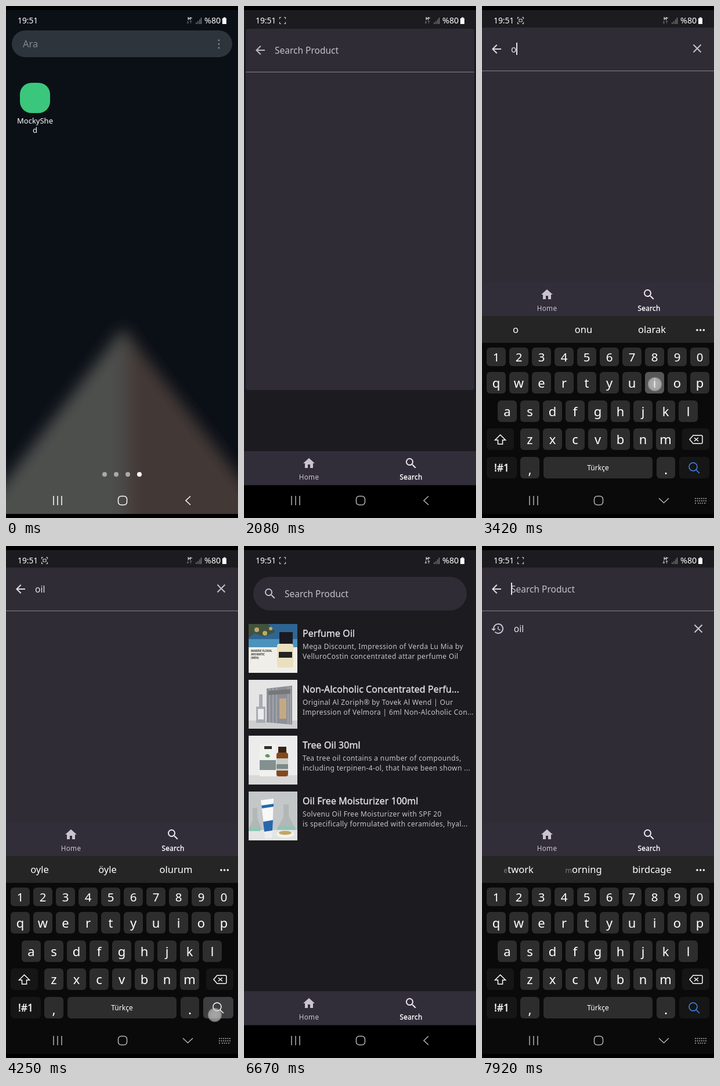
An HTML page without scripts that plays this animation: 400x880 px, repeating every 8 s.

```html
<!DOCTYPE html>
<html lang="en">
<head>
<meta charset="utf-8">
<title>Product search</title>
<style>
html,body{margin:0;width:100%;height:100%;overflow:hidden;background:#000}
#stage{position:relative;width:400px;height:880px;overflow:hidden;background:#000;color:#fff;font:15.5px "Noto Sans","Open Sans",sans-serif}
div,span,svg,g,i,b,path,circle{animation:none 8s linear infinite}
#stage div,#stage svg{position:absolute}
i,b{font-style:normal;font-weight:400}
.full{left:0;top:0;width:400px;height:880px}
.t{white-space:nowrap;line-height:20px}
.c{width:120px;text-align:center}
.mid{-webkit-text-stroke:.35px currentColor}
.ic{width:24px;height:24px;fill:currentColor}
.line{fill:none;stroke:currentColor;stroke-width:1.5}
.step{animation-timing-function:step-end}

/* launcher */
.home{background:#0b1017;animation-name:home}
.pill{left:10px;top:42px;width:380px;height:46px;border-radius:23px;background:#2e343b}
.app-icon{left:24px;top:132px;width:52px;height:52px;border-radius:20px;background:#3bc77b}
@keyframes home{0%{opacity:1}9.4%,100%{opacity:0}}
.splash{background:#1c1b1f;overflow:hidden;animation-name:splash}
.splash div{left:50%;top:50%;border-radius:50%;background:#3bc77b;transform:translate(-50%,-50%);animation-name:logo}
@keyframes splash{
 0%,3.1%{left:24px;top:132px;width:52px;height:52px;border-radius:20px;opacity:0}
 3.2%{left:24px;top:132px;width:52px;height:52px;border-radius:20px;opacity:1;animation-timing-function:ease-out}
 9.3%,12.5%{left:0;top:0;width:400px;height:880px;border-radius:0;opacity:1}
 14.6%,100%{left:0;top:0;width:400px;height:880px;border-radius:0;opacity:0}}
@keyframes logo{0%,3.2%{width:60px;height:60px;animation-timing-function:ease-out}9.3%,100%{width:150px;height:150px}}

/* app */
.app{animation-name:app}
@keyframes app{0%{opacity:0}9.4%,100%{opacity:1}}
.page{left:0;top:0;width:400px;height:824px;background:#1c1b1f}
.panel{background:#2f2c35;overflow:hidden;animation-name:panel}
@keyframes panel{
 0%,24.1%,58.2%,90.9%{left:16px;top:53px;width:368px;height:58px;border-radius:29px}
 26%,92.75%{left:3px;top:39px;width:394px;height:620px;border-radius:4px;animation-timing-function:ease-out}
 28.2%,54.8%,95%,100%{left:0;top:37px;width:400px;height:728px;border-radius:0}}
.field{left:0;top:0;width:400px;height:74px;color:#c6c1cb;animation-name:field}
@keyframes field{0%,24.1%,58.2%,90.9%{transform:translate(4px,-8px)}26%,54.8%,92.75%,100%{transform:none}}
.mag{animation-name:mag}
.arrow{color:#e0dce4;animation-name:arrow}
@keyframes mag{0%,24.1%,58.2%,90.9%{opacity:1}26%,54.8%,92.75%,100%{opacity:0}}
@keyframes arrow{0%,24.1%,58.2%,90.9%{opacity:0}26%,92.75%{opacity:.8}28.2%,54.8%,95%,100%{opacity:1}}
.rule{left:0;top:74px;width:400px;height:1px;background:#85818b}
.hint{animation-name:hint}
@keyframes hint{0%{opacity:1}40.6%{opacity:0}54.3%,100%{opacity:1}}
.q{color:#e6e1e5}
.q i,.clear{opacity:0}
.q i:nth-child(1),.clear{animation-name:q1}
.q i:nth-child(2){animation-name:q2}
.q i:nth-child(3){animation-name:q3}
@keyframes q1{0%{opacity:0}40.6%{opacity:1}54.3%,100%{opacity:0}}
@keyframes q2{0%{opacity:0}43.8%{opacity:1}54.3%,100%{opacity:0}}
@keyframes q3{0%{opacity:0}47.5%{opacity:1}54.3%,100%{opacity:0}}
.caret{left:50px;top:26px;width:1.5px;height:21px;background:#e6e1e5;animation-name:caret}
@keyframes caret{
 0%{opacity:0;transform:none}31%{opacity:1}36.5%{opacity:0}39.6%{opacity:1}
 40.6%{transform:translateX(9px)}43.8%{transform:translateX(13px)}47.5%{transform:translateX(18px)}
 52.5%{opacity:0}60%{transform:none}97%,100%{opacity:1;transform:none}}
.past{left:0;top:94px;width:400px;height:24px;color:#cac4d0;animation-name:past}
@keyframes past{0%{opacity:0}62%,100%{opacity:1}}
.nav{left:0;top:765px;width:400px;height:59px;background:#312d39;color:#cac4d0;animation-name:nav}
.nav::after{content:"";position:absolute;top:58px;width:400px;height:350px;background:#1c1b1f}
.nav .t{font-size:11.7px;letter-spacing:.35px}
@keyframes nav{
 0%,28.5%,57.5%,95.2%{transform:none;animation-timing-function:ease-out}
 32%,54.3%,99%,100%{transform:translateY(-290px)}}
.foot{left:0;top:824px;width:400px;height:56px;background:#000}

/* loading and results */
.spin{left:176px;top:376px;width:48px;height:48px;animation-name:wait}
@keyframes wait{0%{opacity:0}59.4%{opacity:1}71.9%,100%{opacity:0}}
.spin circle{fill:none;stroke:#d0cbd8;stroke-width:4;transform-origin:24px 24px;animation:turn 1.333333s linear infinite,arc 1.333333s ease-in-out infinite}
@keyframes turn{from{transform:rotate(131deg)}to{transform:rotate(561deg)}}
@keyframes arc{0%{stroke-dasharray:12 360;stroke-dashoffset:0}50%{stroke-dasharray:270 360;stroke-dashoffset:-20}100%{stroke-dasharray:12 360;stroke-dashoffset:-290}}
.list{animation-name:list}
@keyframes list{0%{opacity:0}71.9%,100%{opacity:1}}
.item{left:8px;width:392px;height:84px}
.item svg{left:0;top:0;width:84px;height:84px;animation-name:thumb}
.item .t{left:93px;font-size:12px;letter-spacing:.35px;line-height:16.5px;top:31px;color:#c8c3cc}
.item .h{top:6px;font-size:16px;letter-spacing:.06px;line-height:20px;color:#e6e1e5}
@keyframes thumb{0%,74%{opacity:0}80%,100%{opacity:1}}

/* keyboard */
.kb{left:0;top:533px;width:400px;height:347px;background:#0a0a0a;animation-name:kb}
@keyframes kb{
 0%,28.5%,57.5%,95.2%{transform:translateY(347px);animation-timing-function:ease-out}
 32.25%{transform:translateY(6px)}
 33.4%,54.3%,99%,100%{transform:none}}
.words{left:0;top:0;width:400px;height:46px;background:#252525;font-size:16.5px}
.words .c{top:13px}
.words .c:nth-child(1){left:-2px}.words .c:nth-child(2){left:115px}.words .c:nth-child(3){left:233px}
.set{left:0;top:0;opacity:0}
.first{animation-name:first}.second{animation-name:second}.third{animation-name:third}
@keyframes first{0%{opacity:1}40.6%{opacity:0}60%,100%{opacity:1}}
@keyframes second{0%{opacity:0}40.6%{opacity:1}44%,100%{opacity:0}}
@keyframes third{0%{opacity:0}44%{opacity:1}60%,100%{opacity:0}}
.gone{animation-name:gone}.faint{animation-name:faint}
@keyframes gone{0%{opacity:1}90%,100%{opacity:0}}
@keyframes faint{0%{opacity:1;font-size:1em}90%,100%{opacity:.4;font-size:.75em}}
.row{display:flex;gap:6px;left:8px;font-size:22px}
.row b,.key{display:block;width:33px;height:37px;line-height:37px;border-radius:6px;background:#2d2d2e;text-align:center}
.digits{top:54px;font-size:20.5px}
.digits b{height:32px;line-height:32px}
.key{top:242px}
.dark{background:#161616}
.low{font-size:23px;line-height:43px}
.press{left:0;top:0;width:33px;height:37px;border-radius:6px;background:#fff;opacity:0;animation-name:press}
@keyframes press{
 0%{opacity:0;transform:translate(320px,96px)}39.6%{opacity:.2}41.6%{opacity:0}
 42.7%{opacity:.2;transform:translate(281px,96px)}44.8%{opacity:0}
 46.3%{opacity:.2;transform:translate(339px,145px)}48.2%,100%{opacity:0;transform:translate(339px,145px)}}
.go{left:340px;width:52px;animation-name:go}
@keyframes go{0%{background:#161616;color:#4389f0}51.6%{background:#3e3e40;color:#fff}54.2%,100%{background:#161616;color:#4389f0}}

/* system */
.sys{animation-name:sys}
@keyframes sys{0%{color:#fff}9.4%,100%{color:#b4b4b4}}
.on{animation-name:on}.off{animation-name:off}
@keyframes on{0%{opacity:0}29%{opacity:1}55.2%{opacity:0}95.5%,100%{opacity:1}}
@keyframes off{0%{opacity:1}29%{opacity:0}55.2%{opacity:1}95.5%,100%{opacity:0}}
.rec{animation-name:app}
.dotrec{animation-name:dotrec}
@keyframes dotrec{0%{opacity:0}9.4%{opacity:1}20.875%{opacity:0}28.1%{opacity:1}71.2%,100%{opacity:0}}
.data{animation-name:data}
@keyframes data{0%{opacity:.45}33.4%{opacity:1}36.5%{opacity:.45}60.4%,100%{opacity:1}}
.plus{animation-name:list}
.touch{left:-12px;top:-12px;width:24px;height:24px;border-radius:50%;background:radial-gradient(#eee9,#ccca 55%,#aaa6 85%,#aaa0);animation-name:touch}
@keyframes touch{
 0%{opacity:0;transform:translate(50px,158px)}2.15%{opacity:1}4.1%{opacity:0}
 22.8%{opacity:1;transform:translate(210px,84px)}24.1%{opacity:0}
 39.6%{opacity:1;transform:translate(336px,650px)}41.6%{opacity:0}
 42.7%{opacity:1;transform:translate(298px,650px)}44.8%{opacity:0}
 46.3%{opacity:1;transform:translate(355px,699px)}48.2%{opacity:0}
 51.6%{opacity:1;transform:translate(360px,806px)}54.2%{opacity:0}
 89.6%{opacity:1;transform:translate(210px,84px)}90.9%,100%{opacity:0;transform:translate(210px,84px)}}
.edge{left:0;width:400px;height:7px;background:#000}
</style>
</head>
<body>
<svg width="0" height="0" style="position:absolute">
 <symbol id="mag" viewBox="0 0 24 24"><path d="M15.5 14h-.79l-.28-.27A6.47 6.47 0 0 0 16 9.5 6.5 6.5 0 1 0 9.5 16c1.61 0 3.09-.59 4.23-1.57l.27.28v.79l5 4.99L20.49 19l-4.99-5zm-6 0a4.5 4.5 0 1 1 0-9 4.5 4.5 0 0 1 0 9z"/></symbol>
 <symbol id="back" viewBox="0 0 24 24"><path d="M20 11H7.83l5.59-5.59L12 4l-8 8 8 8 1.41-1.41L7.83 13H20z"/></symbol>
 <symbol id="house" viewBox="0 0 24 24"><path d="M10 20v-6h4v6h5v-8h3L12 3 2 12h3v8z"/></symbol>
 <symbol id="close" viewBox="0 0 24 24"><path d="M5.5 5.5l13 13m0-13l-13 13" fill="none" stroke="currentColor" stroke-width="2"/></symbol>
 <symbol id="clock" viewBox="0 0 24 24"><path d="M13 3a9 9 0 0 0-9 9H1l4 4 4-4H6a7 7 0 1 1 7 7c-1.93 0-3.68-.79-4.94-2.06l-1.42 1.42A9 9 0 1 0 13 3zm-1 5v5l4.28 2.54.72-1.21-3.5-2.08V8z"/></symbol>
</svg>
<div id="stage">

<div class="home full step">
 <svg class="full" viewBox="0 0 400 880">
  <defs>
   <filter id="soft" x="-20%" y="-20%" width="140%" height="140%"><feGaussianBlur stdDeviation="13"/></filter>
   <linearGradient id="stone" gradientUnits="userSpaceOnUse" x1="192" y1="0" x2="224" y2="0"><stop stop-color="#4d4f4e"/><stop offset="1" stop-color="#433935"/></linearGradient>
  </defs>
  <path d="M202 553L450 870V940H-50V880z" fill="url(#stone)" filter="url(#soft)"/>
  <g fill="#aaa"><circle cx="170" cy="805" r="4"/><circle cx="190" cy="805" r="4"/><circle cx="210" cy="805" r="4"/><circle cx="230" cy="805" r="4" fill="#fff"/></g>
 </svg>
 <div class="pill"></div>
 <div class="t" style="left:29px;top:55px;font-size:16.5px;color:#83888d">Ara</div>
 <svg style="left:364px;top:56px" width="6" height="20" fill="#868a8f"><circle cx="3" cy="3" r="1.4"/><circle cx="3" cy="9.5" r="1.4"/><circle cx="3" cy="16" r="1.4"/></svg>
 <div class="app-icon"></div>
 <div class="t c" style="left:-10px;top:190px;font-size:13px;line-height:15.5px">MockyShe<br>d</div>
</div>

<div class="app full step">
 <div class="page"></div>
 <div class="list full step">
  <div class="item" style="top:134px">
   <svg viewBox="0 0 84 84"><path fill="#f0eee8" d="M0 0h84v84H0z"/><path fill="#2f6593" d="M0 0h84v40H0z"/><path fill="#4b92bd" d="M0 26h84v14H0z"/><path fill="#40533c" d="M0 0h34l12 14-20 8-16-6-10 8z"/><g fill="#c5a668"><circle cx="14" cy="10" r="4"/><circle cx="28" cy="16" r="4"/><circle cx="38" cy="8" r="3"/></g><path fill="#1a1a20" d="M53 14h23v20H53z"/><rect x="49" y="34" width="28" height="41" rx="4" fill="#eadfbe"/><path fill="#222" d="M52 48h23v10H52z"/><g font-size="4.5" font-weight="700" fill="#333"><text x="4" y="48">MARINE FLORAL</text><text x="4" y="54">AROMATIC</text><text x="4" y="60">(MEN)</text></g></svg>
   <div class="t h mid">Perfume Oil</div>
   <div class="t">Mega Discount, Impression of Verda Lu Mia by<br>VelluroCostin concentrated attar perfume Oil</div>
  </div>
  <div class="item" style="top:230px">
   <svg viewBox="0 0 84 84"><path fill="#e5e5e5" d="M0 0h84v84H0z"/><path fill="#cfcfd0" d="M0 70h84v14H0z"/><path fill="#8d8f98" d="M31 15l44-5v67l-44-4z"/><path d="M36 14v59m6-59v60m6-60v60m20-62v64m4-64v64" stroke="#b9bac1"/><path fill="#c2a984" d="M53 32h12v35H53z"/><path fill="#777" d="M34 19l38-3v8l-38 2z"/><path fill="#a9acb2" d="M18 25h6v21h-6zM13 46h16v28H13z"/><path fill="#e9edf0" d="M16 50h10v18H16z"/></svg>
   <div class="t h mid">Non-Alcoholic Concentrated Perfu...</div>
   <div class="t">Original Al Zoriph® by Tovek Al Wend | Our<br>Impression of Velmora | 6ml Non-Alcoholic Con...</div>
  </div>
  <div class="item" style="top:326px">
   <svg viewBox="0 0 84 84"><path fill="#ececec" d="M0 0h84v84H0z"/><path fill="#d8d8d8" d="M0 68h84v16H0z"/><path fill="#f1f1ee" d="M19 14h28v56H19z"/><path fill="#83908f" d="M19 42h28v17H19z"/><path fill="#5d9862" d="M28 34q6-6 9 2-6 4-9-2z"/><path fill="#2f302f" d="M27 18h13v5H27z"/><path fill="#382217" d="M51 19h14v12H51z"/><rect x="48" y="29" width="20" height="41" rx="4" fill="#85481d"/><path fill="#c8cdca" d="M48 39h20v21H48z"/><path fill="#7d8986" d="M48 49h20v8H48z"/></svg>
   <div class="t h mid">Tree Oil 30ml</div>
   <div class="t">Tea tree oil contains a number of compounds,<br>including terpinen-4-ol, that have been shown ...</div>
  </div>
  <div class="item" style="top:422px">
   <svg viewBox="0 0 84 84"><path fill="#c4c7c8" d="M0 0h84v84H0z"/><path fill="#e3e5e5" d="M0 66h84v18H0z"/><path fill="#b2b7b8" d="M7 28h8v18l8 20H0l7-18zM60 22h9v20l13 24H48l12-22z"/><path fill="#8fc5b5" d="M0 62h20v6H0zM50 60h30v6H50z"/><path fill="#f7f8f8" d="M21 15l22-3-2 58-13 2z"/><path fill="#2867ac" d="M22 24l21-3v5l-20 3zM25 52l17-3-1 18-14 2z"/><path fill="#eee" d="M27 70l14-2-1 12-12 1z"/><ellipse cx="63" cy="73" rx="15" ry="6" fill="#f4f4ef"/><ellipse cx="63" cy="71" rx="11" ry="3.5" fill="#c1a665"/></svg>
   <div class="t h mid">Oil Free Moisturizer 100ml</div>
   <div class="t">Solvenu Oil Free Moisturizer with SPF 20<br>is specifically formulated with ceramides, hyal...</div>
  </div>
 </div>
 <svg class="spin step" viewBox="0 0 48 48"><circle cx="24" cy="24" r="18.5" pathLength="360"/></svg>
 <div class="panel">
  <div class="field">
   <svg class="ic mag" style="left:13px;top:25px"><use href="#mag"/></svg>
   <svg class="ic arrow" style="left:13px;top:25px"><use href="#back"/></svg>
   <div class="t hint step" style="left:50px;top:27px">Search Product</div>
   <div class="t q" style="left:50px;top:27px"><i class="step">o</i><i class="step">i</i><i class="step">l</i></div>
   <div class="caret step"></div>
   <svg class="ic clear step" style="left:359px;top:24px"><use href="#close"/></svg>
  </div>
  <div class="rule"></div>
  <div class="past step">
   <svg class="ic" style="left:15px;top:-1px"><use href="#clock"/></svg>
   <div class="t" style="left:55px;top:1px;color:#e6e1e5">oil</div>
   <svg class="ic" style="left:361px;top:-1px"><use href="#close"/></svg>
  </div>
 </div>
 <div class="nav">
  <svg class="ic" style="left:100px;top:9px"><use href="#house"/></svg>
  <div class="t c" style="left:52px;top:34px">Home</div>
  <svg class="ic" style="left:276px;top:9px;color:#eee9f2"><use href="#mag"/></svg>
  <div class="t c mid" style="left:228px;top:34px;color:#fff">Search</div>
 </div>
 <div class="foot"></div>
</div>

<div class="kb">
 <div class="words">
  <div class="set first step"><div class="t c"><i class="gone step">n</i><i class="faint step">e</i>twork</div><div class="t c"><i class="faint step">m</i>orning</div><div class="t c">birdcage</div></div>
  <div class="set second step"><div class="t c">o</div><div class="t c">onu</div><div class="t c">olarak</div></div>
  <div class="set third step"><div class="t c">oyle</div><div class="t c">öyle</div><div class="t c">olurum</div></div>
  <svg style="left:368px;top:21px" width="18" height="6" fill="#fff"><circle cx="3" cy="3" r="1.8"/><circle cx="8.7" cy="3" r="1.8"/><circle cx="14.4" cy="3" r="1.8"/></svg>
 </div>
 <div class="row digits"><b>1</b><b>2</b><b>3</b><b>4</b><b>5</b><b>6</b><b>7</b><b>8</b><b>9</b><b>0</b></div>
 <div class="row" style="top:96px"><b>q</b><b>w</b><b>e</b><b>r</b><b>t</b><b>y</b><b>u</b><b>i</b><b>o</b><b>p</b></div>
 <div class="row" style="top:145px;left:27px"><b>a</b><b>s</b><b>d</b><b>f</b><b>g</b><b>h</b><b>j</b><b>k</b><b>l</b></div>
 <div class="row" style="top:193px;left:66px"><b>z</b><b>x</b><b>c</b><b>v</b><b>b</b><b>n</b><b>m</b></div>
 <div class="key dark" style="left:8px;top:193px;width:47px"></div>
 <div class="key dark" style="left:345px;top:193px;width:47px"></div>
 <div class="key dark mid" style="left:8px;width:52px;font-size:17.5px">!#1</div>
 <div class="key low" style="left:66px">,</div>
 <div class="key" style="left:106px;width:188px;font-size:12px">Türkçe</div>
 <div class="key low" style="left:301px;width:32px">.</div>
 <div class="key go step"><svg class="line" style="left:14px;top:7px" width="24" height="24"><circle cx="10" cy="10" r="7"/><path d="M15 15l6 6"/></svg></div>
 <svg class="line" style="left:0;top:193px" width="400" height="38"><path d="M31.5 11l9 9h-5v7h-8v-7h-5zM364 12h14a2 2 0 0 1 2 2v10a2 2 0 0 1-2 2h-14l-6-7zM366 16l7 6m0-6l-7 6"/></svg>
 <div class="press step"></div>
</div>

<div class="splash"><div></div></div>

<div class="sys full step">
 <svg class="full line" viewBox="0 0 400 880">
  <path d="M82 842v16m7-16v16m7-16v16"/>
  <rect x="193.5" y="842.5" width="15" height="15" rx="5"/>
  <path class="off step" d="M318 842.5l-8 7.500 8 7.500"/>
  <path class="on step" d="M305 846l8.500 8 8.500-8"/>
  <path class="on step" d="M367 846.5h20m-20 4h20m-20 4h3m2 0h9m2 0h4" stroke-dasharray="2 1.6"/>
  <g stroke="#ccc" stroke-width="1.2">
   <path class="rec step" d="M64 19.5h-2.500v3m0 5v3H64m5-11h2.500v3m0 5v3H69"/>
   <path class="dotrec step" d="M64 22.5h5v4.500h-5z"/>
   <path class="data step" d="M313.5 25v5m-2-2l2 2 2-2m3 2v-5m-2 2l2-2 2 2" stroke-width="1"/>
  </g>
  <path d="M328 28v3m3-5v5m3-8v8m2.500-11v11" stroke="#777"/>
  <path d="M373 21h7v10h-7zM375 19.5h3.500V21H375z" fill="#fff" stroke="none"/>
  <g fill="#fff" stroke="none" font-weight="700" font-size="7.5"><text x="313" y="24">H</text><text class="plus step" x="318" y="23" font-size="6">+</text></g>
 </svg>
 <div class="t" style="left:20px;top:15px;font-size:13.8px;color:#fff">19:51</div>
 <div class="t" style="left:342px;top:15px;font-size:14.3px;color:#fff">%80</div>
</div>

<div class="touch step"></div>
<div class="edge" style="top:0"></div>
<div class="edge" style="top:873px"></div>
</div>
</body>
</html>
```
